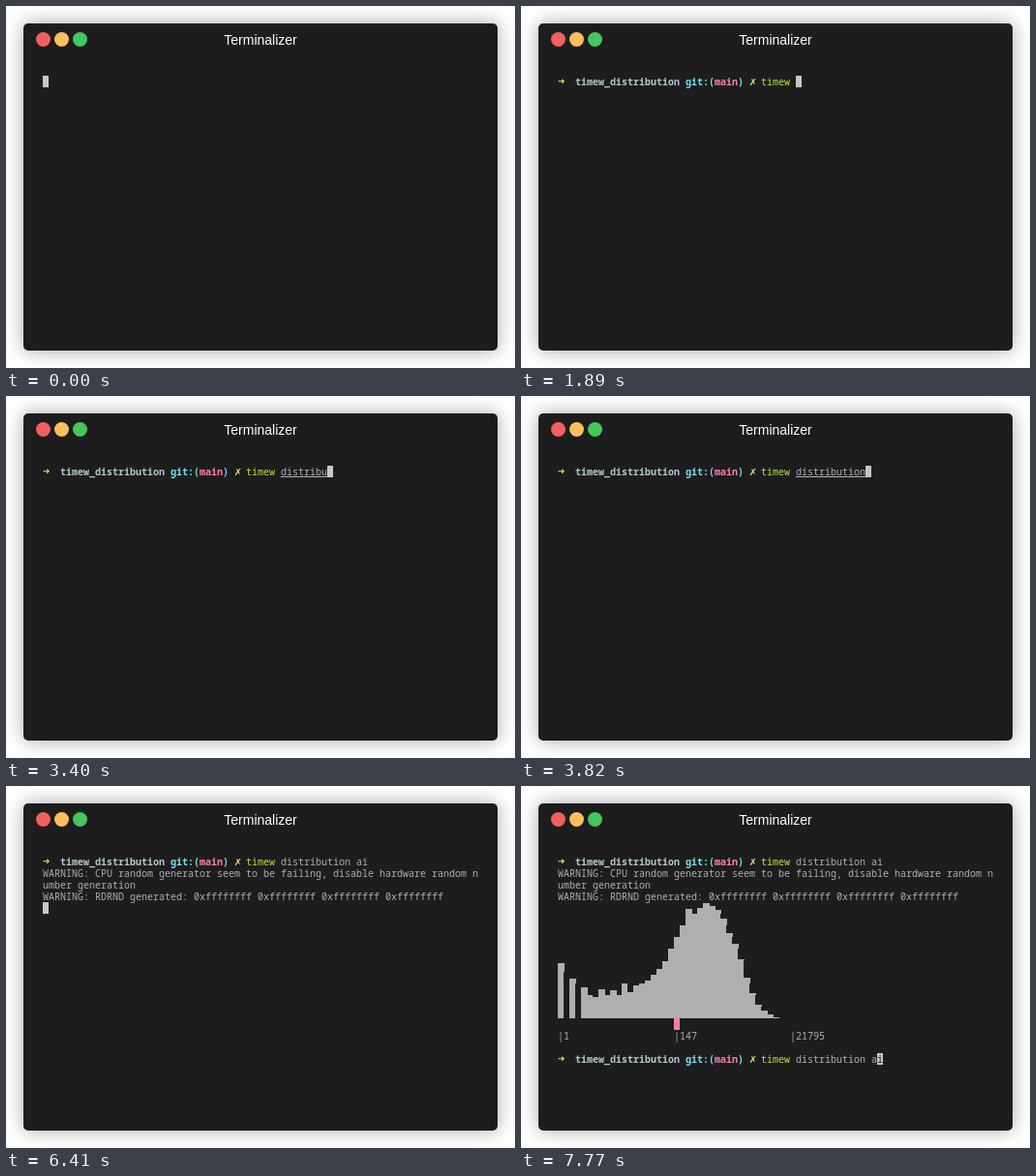
An HTML page that plays this animation: 526 px wide and 374 px high, repeating every 8000 ms.

```html
<!DOCTYPE html>
<html lang="en">
<head>
<meta charset="utf-8">
<title>Terminal</title>
<style>
  html, body { margin: 0; width: 100%; height: 100%; overflow: hidden; background: #fff; }
  .window {
    position: absolute; left: 18px; top: 18px; width: 490px; height: 338px;
    border-radius: 5px; background: #1d1d1d; box-shadow: 0 0 20px rgba(0, 0, 0, .35);
  }
  svg { position: absolute; left: 0; top: 0; display: block; }
  text { font: 10px "Noto Sans Mono", monospace; fill: #afafaf; white-space: pre; }
  .title { font: 14px "Liberation Sans", Arial, sans-serif; fill: #fff; text-anchor: middle; }
  .bold { font-weight: 700; }
  .symbol { font: 700 12px "DejaVu Sans Mono", monospace; }
  .green { fill: #b3e33b; }
  .yellow { fill: #ffa727; }
  .lime { fill: #c8ed71; }
  .teal { fill: #b1c6ca; }
  .blue { fill: #75dff2; }
  .pink { fill: #ff7fac; }
  .sand { fill: #ebdf86; }
  .ink { fill: #1d1d1d; }
  .block { fill: #afafaf; }
</style>
</head>
<body>
<div class="window"></div>
<svg width="526" height="374" viewBox="0 0 526 374">
  <circle cx="38.5" cy="34.5" r="7.5" fill="#f25f5f"/>
  <circle cx="57.5" cy="34.5" r="7.5" fill="#fbbf5c"/>
  <circle cx="76.5" cy="34.5" r="7.5" fill="#44c75c"/>
  <text class="title" x="263" y="40">Terminalizer</text>
  <g id="screen"></g>
</svg>
<script>
const LOOP = 8000, LEFT = 38, TOP = 72, CELL_W = 6, CELL_H = 12, INPUT_COL = 35;
const COMMAND = 'timew distribution ai';
const KEY_TIMES = [900, 980, 1050, 1130, 1200, 1890, 2090, 2170, 2250, 2790, 3010, 3120,
  3300, 3400, 3580, 3660, 3740, 3820, 4410, 5270, 5300];
const BAR_TOPS = [183, 240, 199, 240, 208, 216, 218, 210, 216, 211, 216, 204, 213, 206, 204,
  201, 195, 189, 181, 168, 156, 144, 127, 132, 126, 121, 124, 128, 137, 152, 163, 179, 198,
  214, 226, 232, 236, 239];
const BASE = 240;

const screen = document.getElementById('screen');
const timed = [];
const colX = col => LEFT + col * CELL_W;
const rowY = row => TOP + row * CELL_H;

function add(parent, tag, attrs) {
  const el = document.createElementNS('http://www.w3.org/2000/svg', tag);
  for (const name in attrs) el.setAttribute(name, attrs[name]);
  return parent.appendChild(el);
}
function write(parent, col, row, text, style = '') {
  const el = add(parent, 'text', { x: colX(col), y: rowY(row) + 10, class: style });
  el.textContent = text;
  return el;
}
function box(parent, x, y, width, height, style) {
  return add(parent, 'rect', { x, y, width, height, class: style });
}
function groupFrom(start) {
  const el = add(screen, 'g', {});
  timed.push({ el, start });
  return el;
}
function prompt(start, row) {
  const g = groupFrom(start);
  write(g, 0, row, '➜', 'symbol lime');
  write(g, 3, row, 'timew_distribution', 'bold teal');
  write(g, 22, row, 'git:(', 'bold blue');
  write(g, 27, row, 'main', 'bold pink');
  write(g, 31, row, ')', 'bold blue');
  write(g, 33, row, '✗', 'symbol sand');
}

prompt(100, 0);
const verb = write(screen, INPUT_COL, 0, '');
const args = write(screen, INPUT_COL + 6, 0, '');
const underline = box(screen, colX(INPUT_COL + 6), rowY(1) - 1, 0, 1, 'block');

const warnings = groupFrom(6410);
write(warnings, 0, 1, 'WARNING: CPU random generator seem to be failing, disable hardware random n');
write(warnings, 0, 2, 'umber generation');
write(warnings, 0, 3, 'WARNING: RDRND generated:' + ' 0xffffffff'.repeat(4));

const chart = groupFrom(6630);
BAR_TOPS.forEach((top, col) => {
  // Partial cells are one pixel wider than full ones.
  const full = BASE - Math.floor((BASE - top) / CELL_H) * CELL_H;
  box(chart, colX(col), full, CELL_W, BASE - full, 'block');
  box(chart, colX(col), top, CELL_W + 1, full - top, 'block');
});
box(chart, colX(20), BASE, CELL_W, CELL_H, 'pink');
write(chart, 0, 15, '|1');
write(chart, 20, 15, '|147');
write(chart, 40, 15, '|21795');

prompt(6830, 17);
const recalled = groupFrom(7770);
write(recalled, INPUT_COL, 17, 'timew', 'green');
write(recalled, INPUT_COL + 6, 17, 'distribution a');

const cursor = box(screen, 0, 0, CELL_W, CELL_H, '');
cursor.setAttribute('fill', '#c7c7c7');
write(groupFrom(7770), INPUT_COL + 20, 17, 'i', 'ink');

function cursorCell(t, typed) {
  if (t < 100) return [0, 0];
  if (t < 6030) return [INPUT_COL + typed, 0];
  if (t < 6410) return [0, 1];
  if (t < 6630) return [0, 4];
  if (t < 6830) return [0, 17];
  return [t < 7770 ? INPUT_COL : INPUT_COL + 20, 17];
}
function verbStyle(typed) {
  return typed < 4 ? 'bold pink' : typed === 4 ? 'yellow' : 'green';
}
function render(t) {
  for (const { el, start } of timed) el.style.display = t >= start ? '' : 'none';
  const typed = KEY_TIMES.filter(key => key <= t).length;
  verb.textContent = COMMAND.slice(0, Math.min(typed, 5));
  verb.setAttribute('class', verbStyle(typed));
  args.textContent = COMMAND.slice(6, Math.max(typed, 6));
  underline.setAttribute('width', typed > 6 && typed <= 18 ? (typed - 6) * CELL_W : 0);
  const [col, row] = cursorCell(t, typed);
  cursor.setAttribute('x', colX(col));
  cursor.setAttribute('y', rowY(row));
}

const begin = performance.now();
function tick() {
  render((performance.now() - begin) % LOOP);
  requestAnimationFrame(tick);
}
tick();
</script>
</body>
</html>
```
